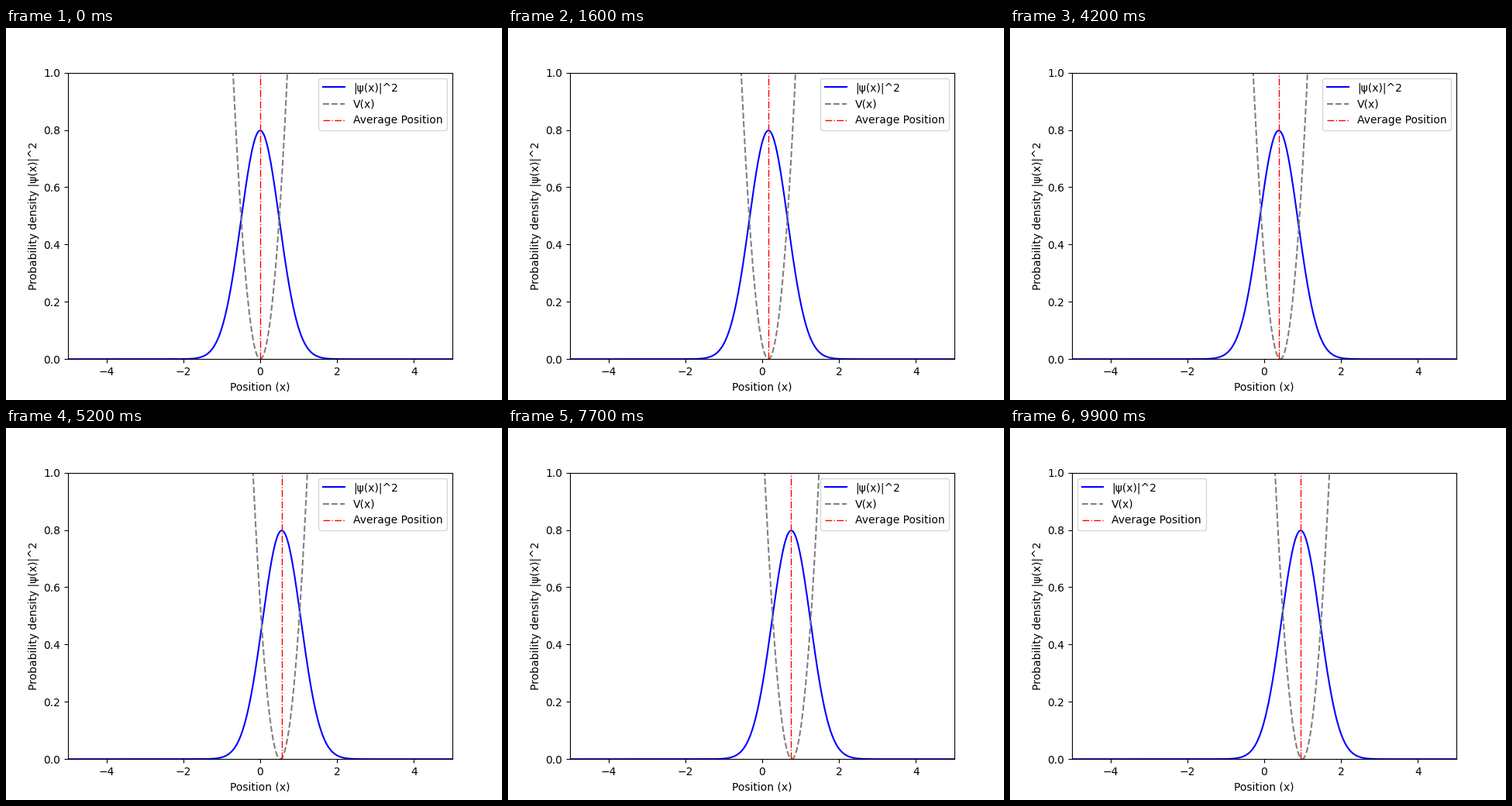
These frames come from a looping animation (640x480 px, 10 s). A matplotlib script:

```python
import numpy as np
import matplotlib.pyplot as plt
from matplotlib.animation import FuncAnimation

FRAMES = 100
DT = 0.1       # time per frame
OMEGA = 2.0    # trap frequency (m = hbar = 1)
SPEED = 0.1    # drift speed of the trap

x = np.linspace(-5, 5, 1000)


def potential(t):
    return 0.5 * OMEGA**2 * (x - SPEED * t) ** 2


def mean_position(t):
    """Classical path of a packet at rest in a trap that starts to drift."""
    return SPEED * t - SPEED / OMEGA * np.sin(OMEGA * t)


def density(center):
    return np.sqrt(OMEGA / np.pi) * np.exp(-OMEGA * (x - center) ** 2)


fig, ax = plt.subplots(figsize=(6.4, 4.8), dpi=100)
psi_line, = ax.plot(x, density(0), color="blue", label="|ψ(x)|^2")
v_line, = ax.plot(x, potential(0), color="gray", ls="--", label="V(x)")
mean_line = ax.axvline(0, color="red", ls="-.", lw=1, label="Average Position")
ax.set(xlim=(-5, 5), ylim=(0, 1),
       xlabel="Position (x)", ylabel="Probability density |ψ(x)|^2")
ax.legend(loc="best")


def update(i):
    t = i * DT
    center = mean_position(t)
    psi_line.set_ydata(density(center))
    v_line.set_ydata(potential(t))
    mean_line.set_xdata([center, center])
    return psi_line, v_line, mean_line


anim = FuncAnimation(fig, update, frames=FRAMES, interval=100,
                     repeat=True, repeat_delay=0, blit=False)
plt.show()
```
